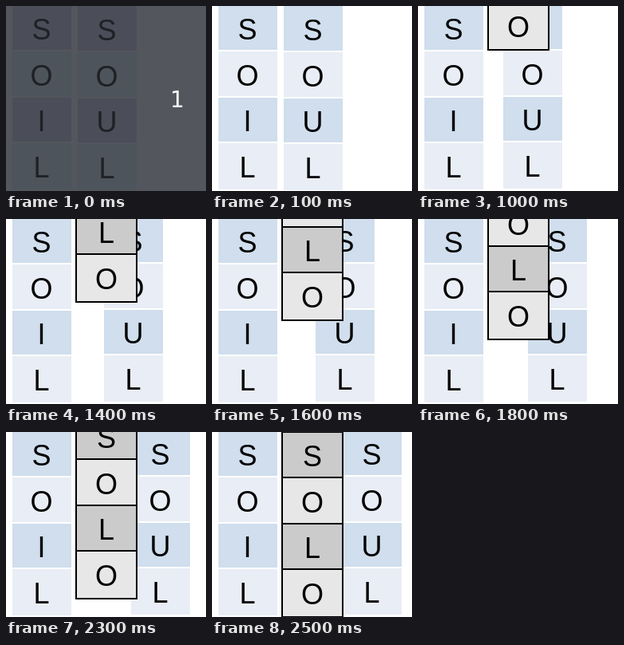
Recreate the animation shown at these times as an HTML page. Size 251 by 232 pixels, loop 3100 ms.

```html
<!DOCTYPE html>
<html lang="en">
<head>
<meta charset="utf-8">
<title>Word columns</title>
<style>
  html, body { margin: 0; width: 100%; height: 100%; overflow: hidden; background: #fff; }
  svg { display: block; width: 251px; height: 232px;
        --bg: #fff; --odd: #d0deed; --even: #e9edf5; --ink: #000; }
  svg.dim { --bg: #54565d; --odd: #4b4e59; --even: #4d545b; --ink: #1f2126; }
  .bg { fill: var(--bg); }
  .odd { fill: var(--odd); }
  .even { fill: var(--even); }
  text { font: 36px "Liberation Sans", Arial, sans-serif; text-anchor: middle; fill: var(--ink); }
  .box rect { stroke: #000; stroke-width: 2; }
  .box { --odd: #cbcbcb; --even: #e7e7e7; }
  #count { font: 28px "DejaVu Sans", Verdana, sans-serif; fill: #fff; display: none; }
  .dim #count { display: block; }
</style>
</head>
<body>
<svg id="stage" viewBox="0 0 251 232">
  <rect class="bg" width="251" height="232"/>
  <g id="left"></g>
  <g id="right"></g>
  <g id="middle" class="box"></g>
  <text id="count" x="215" y="127">1</text>
</svg>
<script>
const LOOP = 3100, START = 500, STEP = 100, STEPS = 20;
const stage = document.getElementById("stage");
const [left, right, middle] = ["left", "right", "middle"].map(id => document.getElementById(id));

function add(parent, name, attrs, label = "") {
  const el = document.createElementNS("http://www.w3.org/2000/svg", name);
  for (const key in attrs) el.setAttribute(key, attrs[key]);
  el.textContent = label;
  parent.append(el);
}

// Each column is four cells between the given edges, with a gap below each.
function column(parent, word, edges, width, gap, textX, baseline) {
  [...word].forEach((letter, i) => {
    const y = edges[i];
    add(parent, "rect", { class: i % 2 ? "even" : "odd", x: 0, y, width, height: edges[i + 1] - y - gap });
    add(parent, "text", { x: textX, y: baseline + Math.round(57.6 * i) }, letter);
  });
}

const cells = [-2, 57, 115, 172, 232];
column(left, "SOIL", cells, 74, 2, 36.5, 42);
column(right, "SOUL", cells, 74, 2, 36.5, 42);
column(middle, "SOLO", [0, 57, 115, 172, 232], 76, 0, 38, 43);

function move(el, x, y) {
  el.setAttribute("transform", `translate(${x} ${y})`);
}

// Step number and share of the path covered.
const path = [[0, 0], [1, .039], [5, .237], [6, .285], [9, .448], [12, .598], [13, .651], [18, .901], [20, 1]];

function progress(step) {
  const i = Math.max(1, path.findIndex(([s]) => s >= step));
  const [s0, p0] = path[i - 1], [s1, p1] = path[i];
  return p0 + (p1 - p0) * (step - s0) / (s1 - s0);
}

function draw(now) {
  const t = now % LOOP;
  const step = Math.min(STEPS, Math.max(0, Math.floor((t - START) / STEP)));
  const p = progress(step);
  stage.classList.toggle("dim", t < 100);
  move(right, 90 + Math.round(74 * p - .1), step ? -1 : 1);
  move(middle, 88, Math.round(232 * p) - 232);
  middle.style.display = step ? "" : "none";
  requestAnimationFrame(draw);
}

move(left, 8, 0);
draw(performance.now());
</script>
</body>
</html>
```
